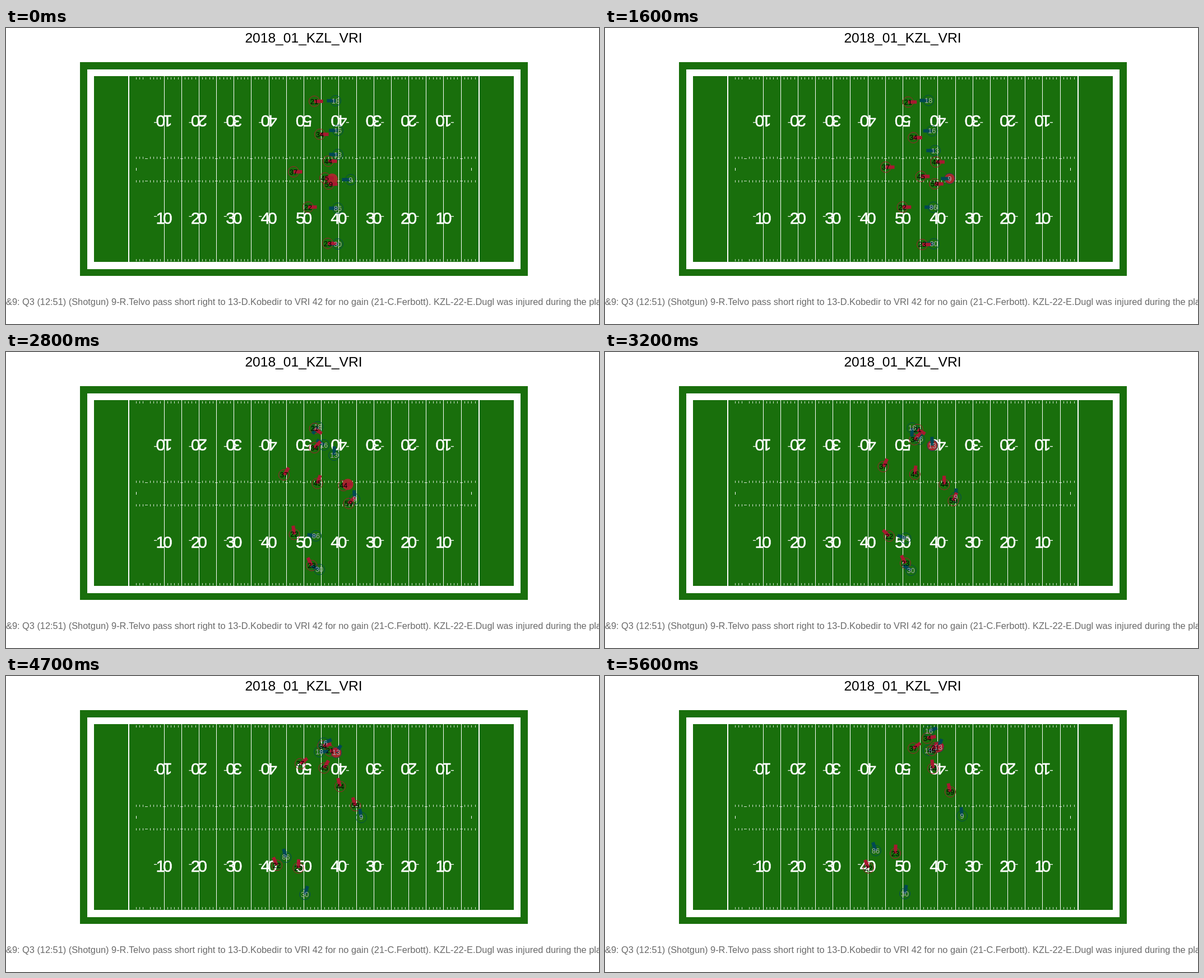
An HTML page with a canvas for the animation above (5.7 s loop, 1058 by 529 pixels).

```html
<!DOCTYPE html>
<html lang="en">
<head>
<meta charset="utf-8">
<title>Play tracking</title>
<style>
  html, body { margin: 0; width: 100%; height: 100%; overflow: hidden; background: #fff; }
  body { position: relative; font-family: "Liberation Sans", Arial, sans-serif; }
  canvas { display: block; width: 1058px; height: 529px; }
  p { position: absolute; margin: 0; white-space: pre; line-height: 30px; }
  #title { left: 0; width: 1062px; top: 3px; text-align: center; font-size: 24.6px; color: #000; }
  #caption { left: 0; top: 474px; font-size: 16.35px; color: #696969; }
</style>
</head>
<body>
<canvas id="stage" width="1058" height="529"></canvas>
<p id="title">2018_01_KZL_VRI</p>
<p id="caption">&amp;9: Q3 (12:51) (Shotgun) 9-R.Telvo pass short right to 13-D.Kobedir to VRI 42 for no gain (21-C.Ferbott). KZL-22-E.Dugl was injured during the play.</p>
<script>
const W = 1058, H = 529, LOOP = 5700, STEP = 100;
const YARD = 6.236, CX = 531.5, CY = 252.25;
const GREEN = '#196f0c', FONT = '"Liberation Sans", Arial, sans-serif';
const DEFENSE = { main: '#a71930', text: '#000', front: 1 };
const OFFENSE = { main: '#004953', text: '#a5acaf', front: -1 };

// Every route passes four points at these times.
const KEYS = [0, 2000, 3600, 5600];
const SNAP = { x: 582, y: 270 };
const SNAP_END = 700, THROW = 2600, CATCH = 3200;

const ctx = document.getElementById('stage').getContext('2d');
const player = (team, number, ...route) => ({ team, number, route });

const passer = player(OFFENSE, '9', [615, 271], [616, 268], [629, 257], [637, 250]);
const receiver = player(OFFENSE, '13', [592, 226], [588, 213], [584, 154], [595, 127]);
const players = [
  passer,
  receiver,
  player(OFFENSE, '18', [588, 130], [573, 130], [545, 137], [577, 133]),
  player(OFFENSE, '16', [592, 183], [580, 181], [558, 146], [578, 98]),
  player(OFFENSE, '86', [592, 322], [580, 321], [523, 334], [483, 312]),
  player(OFFENSE, '30', [592, 386], [582, 386], [537, 391], [535, 389]),
  player(DEFENSE, '21', [550, 131], [541, 133], [564, 139], [589, 128]),
  player(DEFENSE, '34', [560, 190], [549, 193], [555, 145], [575, 111]),
  player(DEFENSE, '44', [575, 238], [594, 239], [606, 231], [585, 165]),
  player(DEFENSE, '37', [513, 257], [499, 243], [500, 191], [550, 129]),
  player(DEFENSE, '45', [569, 268], [562, 260], [553, 203], [583, 133]),
  player(DEFENSE, '59', [576, 279], [593, 277], [627, 259], [616, 207]),
  player(DEFENSE, '22', [539, 320], [527, 321], [500, 332], [470, 343]),
  player(DEFENSE, '23', [574, 385], [562, 386], [529, 371], [518, 317])
];

const progress = (t, from, to) => Math.min(Math.max((t - from) / (to - from), 0), 1);
const mix = (a, b, u) => ({ x: a.x + (b.x - a.x) * u, y: a.y + (b.y - a.y) * u });

// Cubic Hermite curve through the route's points along one axis.
function along(route, axis, t) {
  const last = KEYS.length - 1;
  let i = 0;
  while (i < last - 1 && t >= KEYS[i + 1]) i++;
  const slope = k => {
    const a = Math.max(k - 1, 0), b = Math.min(k + 1, last);
    return (route[b][axis] - route[a][axis]) / (KEYS[b] - KEYS[a]);
  };
  const d = KEYS[i + 1] - KEYS[i], u = (t - KEYS[i]) / d, w = 1 - u;
  return w * w * (1 + 2 * u) * route[i][axis] + u * u * (3 - 2 * u) * route[i + 1][axis]
    + d * u * w * (w * slope(i) - u * slope(i + 1));
}

const place = (p, t) => ({ x: along(p.route, 0, t), y: along(p.route, 1, t) });

// Snapped to the passer, carried, thrown, then carried by the receiver.
function ballAt(t) {
  const held = mix(SNAP, place(passer, t), progress(t, 0, SNAP_END));
  return mix(held, place(receiver, t), progress(t, THROW, CATCH));
}

// Players face upfield first, then turn towards their run and the ball.
function facing(p, pos, ball, t) {
  const before = place(p, t - 50), after = place(p, t + 50);
  const dx = ball.x - pos.x, dy = ball.y - pos.y, far = Math.hypot(dx, dy) + 1;
  const turned = {
    x: dx / far + (after.x - before.x) / 2,
    y: dy / far + (after.y - before.y) / 2
  };
  const look = mix({ x: p.team.front, y: 0 }, turned, progress(t, 1600, 3000));
  return Math.atan2(look.y, look.x);
}

function centredBox(g, color, halfX, halfY) {
  const left = Math.round(CX - halfX * YARD), top = Math.round(CY - halfY * YARD);
  const right = Math.round(CX + halfX * YARD), bottom = Math.round(CY + halfY * YARD);
  g.fillStyle = color;
  g.fillRect(left, top, right - left, bottom - top);
}

function paintNumber(g, n, top) {
  const side = Math.sign(n - 50) * (top ? -1 : 1);
  g.save();
  g.translate(CX + (n - 50) * YARD, top ? 166 : 339.5);
  if (top) g.rotate(Math.PI);
  [Math.min(n, 100 - n) / 10, 0].forEach((digit, i) => {
    const x = (2 * i - 1) * YARD;
    g.fillText(digit, x, 10.5);
    g.strokeText(digit, x, 10.5);
  });
  if (side) g.fillRect(side * 15.5 - 2.5, -3.5, 5, 1.3);
  g.restore();
}

function paintField() {
  const layer = document.createElement('canvas');
  layer.width = W;
  layer.height = H;
  const g = layer.getContext('2d');
  const yardX = n => Math.floor(CX + (n - 50) * YARD);
  centredBox(g, GREEN, 64, 30.65);
  centredBox(g, '#fff', 62, 28.65);
  centredBox(g, GREEN, 60, 26.65);

  g.fillStyle = g.strokeStyle = '#fff';
  for (const side of [-1, 1]) {
    g.fillRect(Math.round(CX + side * 50.1 * YARD) - 1, 86, 2, 332);
    g.fillRect(yardX(50 + side * 48), 250, 1, 5);
  }
  for (let n = 10; n <= 95; n += 5) g.fillRect(yardX(n), 86, 1, 332);
  g.globalAlpha = 0.8;
  for (let n = 2; n < 100; n++) {
    const x = yardX(n);
    if (n % 5) {
      for (const y of [88, 230, 272, 413]) g.fillRect(x, y, 1, 4);
    } else {
      for (const y of [233, 273]) g.fillRect(x - 2, y, 5, 1);
    }
  }
  g.globalAlpha = 1;

  g.font = '30px ' + FONT;
  g.textAlign = 'center';
  g.lineWidth = 0.5;
  for (let n = 10; n <= 90; n += 10) {
    paintNumber(g, n, false);
    paintNumber(g, n, true);
  }
  return layer;
}

const field = paintField();

function draw(t) {
  const ball = ballAt(t);
  ctx.clearRect(0, 0, W, H);
  ctx.drawImage(field, 0, 0);

  ctx.fillStyle = '#a52a2a';
  ctx.beginPath();
  ctx.arc(ball.x, ball.y, 10, 0, 2 * Math.PI);
  ctx.fill();

  const poses = players.map(p => {
    const pos = place(p, t);
    return { ...pos, team: p.team, number: p.number, angle: facing(p, pos, ball, t) };
  });
  for (const p of poses) {
    ctx.strokeStyle = p.team.main;
    ctx.lineWidth = 1;
    ctx.beginPath();
    ctx.arc(p.x, p.y, 9.5, 0, 2 * Math.PI);
    ctx.stroke();
  }
  for (const p of poses) {
    ctx.strokeStyle = p.team.main;
    ctx.lineWidth = 6;
    ctx.beginPath();
    ctx.moveTo(p.x, p.y);
    ctx.lineTo(p.x + 15.6 * Math.cos(p.angle), p.y + 15.6 * Math.sin(p.angle));
    ctx.stroke();
  }
  ctx.font = '12.5px ' + FONT;
  ctx.textAlign = 'center';
  for (const p of poses) {
    ctx.fillStyle = p.team.text;
    ctx.fillText(p.number, p.x, p.y + 4.5);
  }
}

const start = performance.now();
function tick() {
  const t = (performance.now() - start) % LOOP;
  draw(Math.floor(t / STEP) * STEP);
  requestAnimationFrame(tick);
}
tick();
</script>
</body>
</html>
```
